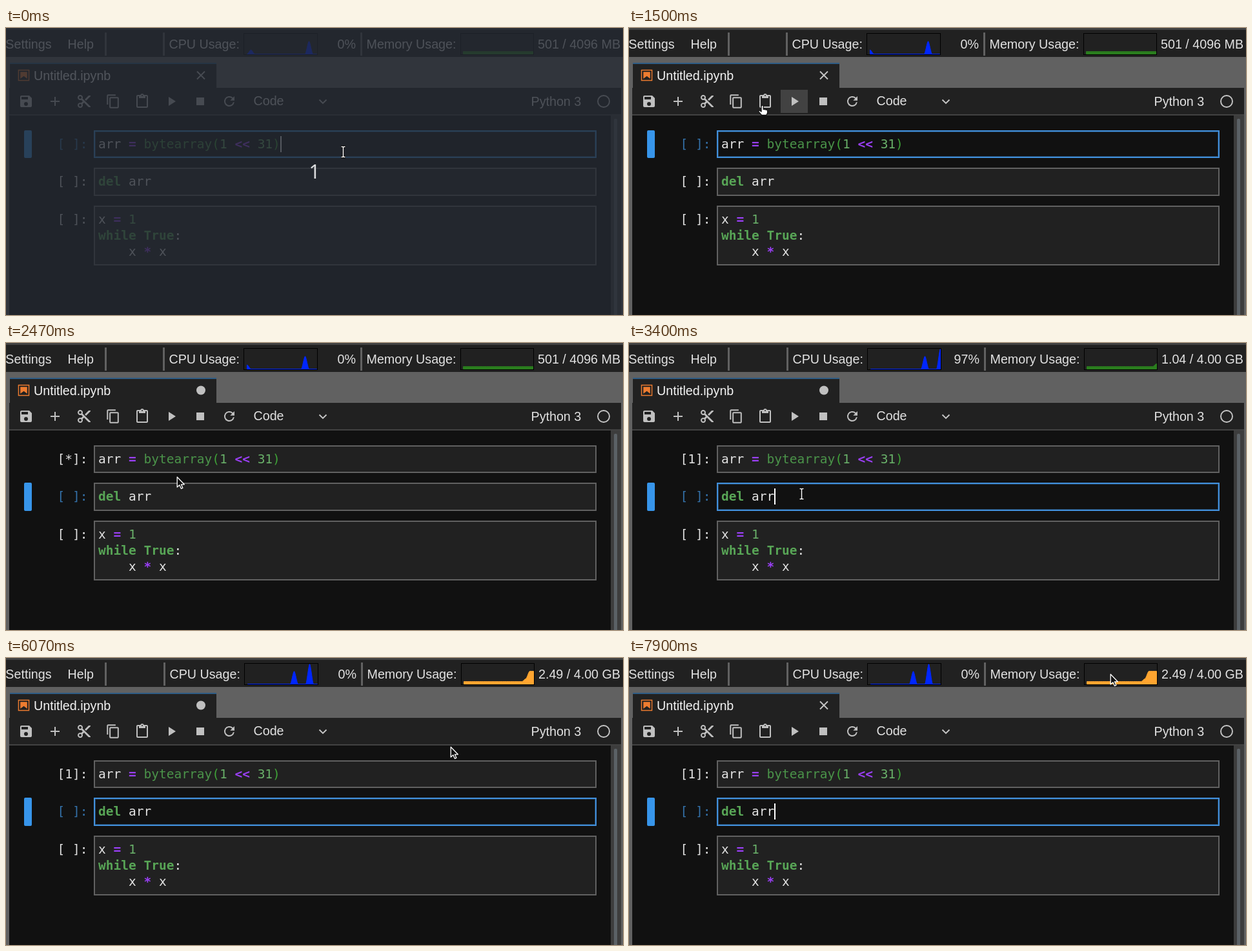
These frames come from a looping animation (956x446 px, 8000 ms). An HTML page:

```html
<!DOCTYPE html>
<html lang="en">
<head>
<meta charset="utf-8">
<title>Notebook resource usage</title>
<style>
  html, body { margin: 0; width: 100%; height: 100%; overflow: hidden; background: #111; }
  svg { display: block; width: 956px; height: 446px; }
  text { font: 19.7px "Liberation Sans", Arial, sans-serif; fill: #e2e2e2; white-space: pre; }
  .code { font: 19.5px "DejaVu Sans Mono", monospace; }
  .kw { fill: #58a556; font-weight: bold; }
  .fn { fill: #4b944a; }
  .num { fill: #69b069; }
  .br { fill: #3fa338; }
  .op { fill: #9a3ff6; font-weight: bold; }
  .icon { fill: #c0c0c0; }
  .line { fill: none; stroke: #c6c6c6; stroke-width: 1.9; }
  .end { text-anchor: end; }
  .spark { fill: #212121; stroke: #000; }
  .arrow, .hand { stroke-linejoin: round; stroke-width: 1.3; }
</style>
</head>
<body>
<svg viewBox="0 0 956 446">
  <!-- window chrome -->
  <rect width="956" height="446" fill="#616161"/>
  <rect width="956" height="45" fill="#212121"/>
  <rect width="956" height="3" fill="#424242"/>
  <rect x="6" y="54" width="320" height="39" fill="#212121"/>
  <rect x="6" y="54" width="320" height="2" fill="#2f5d85"/>
  <rect x="5" y="93" width="948" height="43" fill="#212121"/>
  <rect x="5" y="134" width="948" height="2" fill="#424242"/>
  <rect x="5" y="136" width="932" height="310" fill="#111"/>
  <rect x="937" y="136" width="16" height="310" fill="#3d3d3d"/>
  <rect x="942" y="141" width="5" height="310" rx="2" fill="#5b6166"/>

  <!-- top bar -->
  <text class="end" x="70.5" y="32">Settings</text>
  <text x="95.5" y="32">Help</text>
  <rect x="153" y="7" width="3" height="36" fill="#616161"/>
  <g id="usage">
    <rect x="243" y="7" width="3" height="36" fill="#616161"/>
    <text x="252.5" y="32">CPU Usage:</text>
    <rect class="spark" x="368.5" y="8.5" width="114" height="33"/>
    <path id="cpu" fill="#0026ff" stroke="#0026ff"/>
    <text id="cpuText" class="end" x="542" y="32"></text>
    <rect x="549" y="7" width="3" height="36" fill="#616161"/>
    <text x="558.5" y="32">Memory Usage:</text>
    <rect class="spark" x="704.5" y="8.5" width="113" height="33"/>
    <path id="mem"/>
    <text id="memText" x="824" y="32"></text>
  </g>

  <!-- tab -->
  <path fill="#ee7c30" transform="translate(17 63) scale(.955)"
    d="M18.7 3.3v15.4H3.3V3.3h15.4m1.5-1.5H1.8v18.3h18.3zM16.5 16.5l-5.4-4.3-5.6 4.3v-11h11z"/>
  <text x="43" y="81" style="fill:#f4f4f4">Untitled.ipynb</text>
  <path id="close" class="line" d="M296 67.5l12 12m0-12l-12 12"/>
  <circle id="dirty" cx="302" cy="73.5" r="7" fill="#c0c0c0"/>

  <!-- toolbar -->
  <rect id="hover" x="235" y="96" width="42" height="36" fill="#424242"/>
  <g id="tools"></g>
  <text x="383.5" y="120">Code</text>
  <path class="line" d="M485.5 111.5l5.5 5.5 5.5-5.5"/>
  <text x="813.5" y="121">Python 3</text>
  <circle class="line" cx="926" cy="114" r="9"/>

  <!-- cells -->
  <rect id="bar" x="28" width="12" rx="2" fill="#3795ea"/>
  <g id="cells"></g>
  <g class="lines">
    <text class="code" x="143" y="187">arr <tspan class="op">=</tspan> <tspan class="fn">bytearray</tspan><tspan class="br">(</tspan><tspan class="num">1</tspan> <tspan class="op">&lt;&lt;</tspan> <tspan class="num">31</tspan><tspan class="br">)</tspan></text>
    <text class="code" x="143" y="245"><tspan class="kw">del</tspan> arr</text>
    <text class="code" x="143" y="304">x <tspan class="op">=</tspan> <tspan class="num">1</tspan></text>
    <text class="code" x="143" y="329"><tspan class="kw">while</tspan> <tspan class="kw">True</tspan>:</text>
    <text class="code" x="143" y="354">    x <tspan class="op">*</tspan> x</text>
  </g>
  <rect id="caret" width="2" height="25" fill="#fff"/>

  <!-- countdown -->
  <g id="intro">
    <rect width="956" height="446" fill="rgb(37,42,50)" opacity=".78"/>
    <text x="478" y="234" text-anchor="middle" style="font:30px 'Noto Sans','Open Sans',sans-serif;fill:#dcdddf">1</text>
  </g>

  <g id="pointer">
    <path class="arrow" fill="#111" stroke="#fff"
      d="M.7 .7V16.5l3.6-3.3 2.6 5.6 2.5-1.1-2.5-5.4h4.9z"/>
    <g class="beam" fill="none">
      <path d="M-3.5-8h2.5l1 1 1-1h2.5M0-7V7M-3.5 8h2.5l1-1 1 1h2.5" stroke="#000" stroke-width="3.4"/>
      <path d="M-3-8h2l1 1 1-1h2M0-7V7M-3 8h2l1-1 1 1h2" stroke="#fff" stroke-width="1.5"/>
    </g>
    <path class="hand" fill="#fff" stroke="#111"
      d="M-1.5 1.5q0-1.8 1.6-1.8t1.6 1.8v4.6q1.1-.9 2.2.3 1.2-.8 2.2.4 2-.5 2 1.6v3.2l-1.8 3.4h-7.2l-4.3-5.2q-1.2-1.8.4-2.2 1-.2 3.3 2z"/>
  </g>
</svg>
<script>
const $ = id => document.getElementById(id);
const show = (el, on) => el.style.display = on ? '' : 'none';

// Toolbar icons: path and view box size, each drawn 24px wide
const icons = [
  ['M17 3H5c-1.1 0-2 .9-2 2v14c0 1.1.9 2 2 2h14c1.1 0 2-.9 2-2V7zm-5 16a3 3 0 1 1 0-6 3 3 0 0 1 0 6zm3-10H5V5h10z', 24],
  ['M19 13h-6v6h-2v-6H5v-2h6V5h2v6h6z', 24],
  ['M9.64 7.64A4 4 0 1 0 7.64 9.64L10 12l-2.36 2.36A4 4 0 1 0 9.64 16.36L12 14l7 7h3v-1zM6 8a2 2 0 1 1 0-4 2 2 0 0 1 0 4zm0 12a2 2 0 1 1 0-4 2 2 0 0 1 0 4zM19 3l-6 6 2 2 7-7V3z', 24],
  ['M11.9 1H3.2Q1.7 1 1.7 2.5v10.2h1.5V2.5h8.7zM14.1 3.9h-8q-1.5 0-1.5 1.5v10.2q0 1.5 1.5 1.5h8q1.5 0 1.5-1.5V5.4q0-1.5-1.5-1.5zm0 11.6h-8V5.4h8z', 18],
  ['M19 2h-4.18a3 3 0 0 0-5.64 0H5c-1.1 0-2 .9-2 2v16c0 1.1.9 2 2 2h14c1.1 0 2-.9 2-2V4c0-1.1-.9-2-2-2zm-7 0a1 1 0 1 1 0 2 1 1 0 0 1 0-2zm7 18H5V4h2v3h10V4h2z', 24],
  ['M8 5v14l11-7z', 24],
  ['M6 6h12v12H6z', 24],
  ['M9 13.5a4.5 4.5 0 1 1 3.17-7.67L10 8h5V3l-1.76 1.76A6 6 0 1 0 14.9 10h-1.52A4.5 4.5 0 0 1 9 13.5z', 18]
];
$('tools').innerHTML = icons.map(([d, size], i) =>
  `<path class="icon" d="${d}" transform="translate(${19 + 45 * i} 102) scale(${24 / size})"/>`).join('');

const cells = [[159, 43], [217, 44], [276, 93]];
$('cells').innerHTML = cells.map(([y, h]) =>
  `<rect class="box" x="137" y="${y + 1}" width="777" height="${h - 2}" stroke-width="2"/>
   <rect class="glow" x="138.5" y="${y + 2.5}" width="774" height="${h - 5}" fill="none" stroke="#3b84c8" opacity=".4"/>
   <text class="code prompt" x="79.5" y="${y + 28}"></text>`).join('');
const boxes = document.querySelectorAll('.box');
const glows = document.querySelectorAll('.glow');
const prompts = document.querySelectorAll('.prompt');
const [arrow, beam, hand] = $('pointer').children;

const ticks = [1200, 2800, 4430, 6030, 7670];
const RUN = 2030, DONE = 2960, FOCUS = 3400, BLINK = 533;

// Pointer track: time, x, y
const track = [
  [1030, 522, 192], [1170, 440, 160], [1300, 330, 128], [1400, 257, 116],
  [1500, 207, 120], [1600, 138, 116], [1680, 132, 118], [1830, 250, 117],
  [1930, 254, 117], [2230, 253, 118], [2330, 251, 141], [2430, 262, 200],
  [2470, 264, 207], [2770, 264, 207], [3030, 267, 234], [5370, 267, 234],
  [5550, 330, 222], [5800, 520, 180], [6070, 688, 137], [6170, 712, 112],
  [6270, 724, 82], [6430, 738, 44], [6670, 743, 22], [7870, 743, 22], [7900, 745, 24]
];
function pointerAt(t) {
  const i = track.findIndex(k => k[0] > t);
  if (i < 1) return track[i ? track.length - 1 : 0].slice(1);
  const [t0, x0, y0] = track[i - 1], [t1, x1, y1] = track[i];
  const p = (t - t0) / (t1 - t0);
  return [x0 + (x1 - x0) * p, y0 + (y1 - y0) * p];
}

// Samples by tick number; tick 0 is the newest at the start
const cpuAt = n => ({ '-2': .62, '-17': .2, 2: .97 })[n] || 0;
const memAt = n => n < 2 ? .122 : n < 3 ? .26 : .623;

function area(right, tick, sample) {
  let d = '', px, py;
  for (let age = 18; age >= 0; age--) {
    const x = right - 6 * age, y = 40.5 - 32 * sample(tick - age);
    d += d ? `C${px + 1.5} ${py} ${x - 1.5} ${y} ${x} ${y}` : `M${x} 40.5V${y}`;
    px = x; py = y;
  }
  return d + 'V40.5z';
}

function draw(t) {
  const tick = ticks.filter(k => t >= k).length;
  $('usage').setAttribute('transform', `translate(${tick > 1 ? 1 : 0} 0)`);
  $('cpu').setAttribute('d', area(481.5, tick, cpuAt));
  $('mem').setAttribute('d', area(816.5, tick, memAt));
  const color = memAt(tick) > .5 ? '#ffa530' : '#2a7d1e';
  $('mem').setAttribute('fill', color);
  $('mem').setAttribute('stroke', color);
  $('cpuText').textContent = Math.round(cpuAt(tick) * 100) + '%';
  $('memText').textContent = tick < 2 ? '501 / 4096 MB' : tick < 3 ? '1.04 / 4.00 GB' : '2.49 / 4.00 GB';

  const unsaved = t >= 2130 && t < 7670;
  show($('dirty'), unsaved);
  show($('close'), !unsaved);

  const selected = t < RUN ? 0 : 1;
  const focused = t < RUN ? 0 : t >= FOCUS ? 1 : -1;
  $('bar').setAttribute('y', cells[selected][0]);
  $('bar').setAttribute('height', cells[selected][1]);
  cells.forEach((_, i) => {
    const on = i === focused;
    boxes[i].setAttribute('fill', on ? '#111' : '#212121');
    boxes[i].setAttribute('stroke', on ? '#4290dc' : '#616161');
    show(glows[i], on);
    prompts[i].style.fill = i === selected ? '#3472ab' : '';
    prompts[i].textContent = i || t < RUN ? '[ ]:' : t < DONE ? '[*]:' : '[1]:';
  });

  const lit = focused === 0
    ? t < 170 || t >= 700 && Math.floor((t - 700) / BLINK) % 2 === 0
    : focused === 1 && Math.floor((t - FOCUS) / BLINK) % 2 === 0;
  show($('caret'), lit);
  $('caret').setAttribute('x', focused ? 225 : 425);
  $('caret').setAttribute('y', focused ? 226 : 168);

  show($('intro'), t < 170);

  const [x, y] = pointerAt(t);
  const inCell = x > 136 && x < 915 && cells.some(([top, h]) => y > top && y < top + h);
  const onTool = x > 10 && x < 367 && y > 96 && y < 132;
  show(beam, inCell);
  show(hand, onTool);
  show(arrow, !inCell && !onTool);
  $('pointer').setAttribute('transform', `translate(${Math.round(x) + .5} ${Math.round(y) + .5})`);

  // The highlight trails the pointer slightly
  const [hx, hy] = pointerAt(t - 90);
  show($('hover'), hx > 235 && hx < 277 && hy > 96 && hy < 132);
}

function frame() {
  draw(performance.now() % 8000);
  requestAnimationFrame(frame);
}
frame();
</script>
</body>
</html>
```
